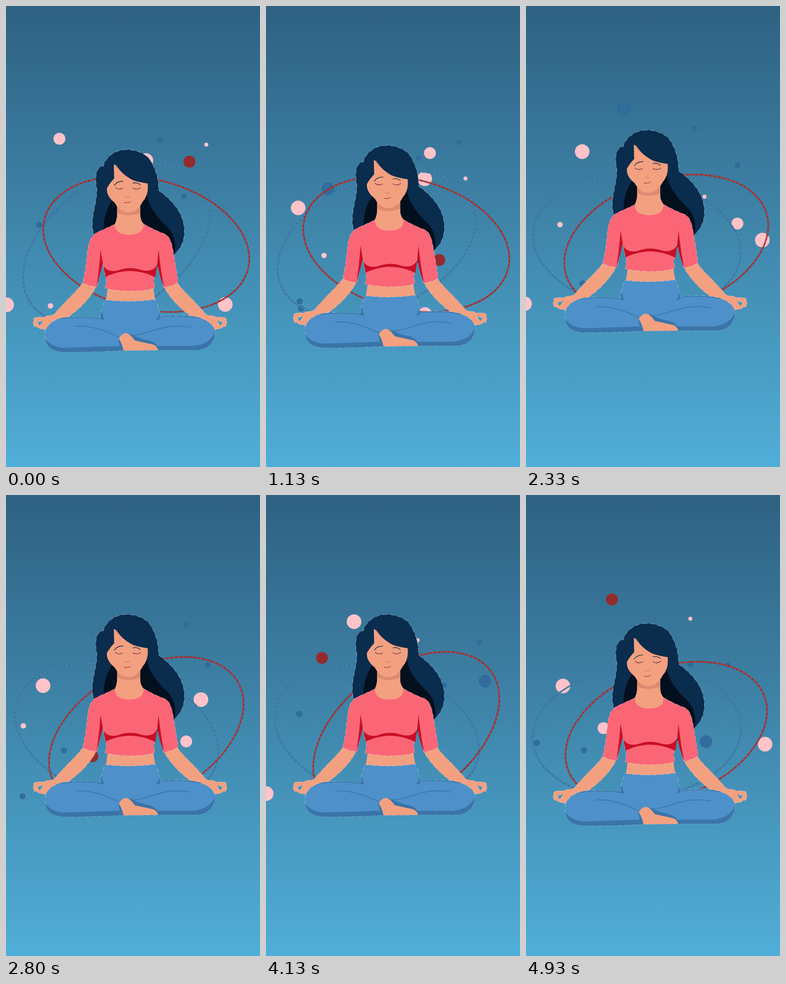
These frames come from a looping animation (556 by 1007 pixels, 4990 ms). An HTML page:

```html
<!DOCTYPE html>
<html lang="en">
<head>
<meta charset="utf-8">
<title>Meditation</title>
<style>
  html, body { margin: 0; width: 100%; height: 100%; overflow: hidden; background: #4187ac; }
  svg { display: block; width: 100vw; height: 100vh; }
  .ring { fill: none; stroke-width: 3.2; }
  .glint { fill: none; stroke: #a9cfe4; stroke-width: .9; stroke-opacity: .55; stroke-dasharray: 7 3; }
  .rim { stroke: #d3e4ee; stroke-opacity: .55; stroke-width: 1; stroke-dasharray: 9 6; }
  .line { fill: none; stroke-linecap: round; }
  .skin { fill: #f3a080; }
  .shirt { fill: #fb6676; }
  .seam { fill: #c90f25; }
  .fold { stroke: #3a74a8; stroke-width: 1.6; }
</style>
</head>
<body>
<svg viewBox="0 0 556 1007" preserveAspectRatio="none">
  <defs>
    <linearGradient id="sky" x2="0" y2="1">
      <stop offset="0" stop-color="#2e6182"/>
      <stop offset=".5" stop-color="#4087ac"/>
      <stop offset="1" stop-color="#50aed8"/>
    </linearGradient>
    <g id="arm">
      <path class="skin rim" fill-rule="evenodd" d="M168 605 Q157 620 137 639 Q117 660 104 675 Q92 676 80 680 L66 680 Q59 682 61 687 Q57 692 61 696 Q60 702 67 701 Q75 707 89 707 Q99 703 108 697 Q140 680 165 656 Q189 632 198 612Z M69 688 L73 690 L80 687 Q79 694 74 698 Q69 694 69 688Z"/>
    </g>
  </defs>
  <rect width="556" height="1007" fill="url(#sky)"/>
  <g id="dots"></g>
  <g id="blueRing">
    <ellipse class="ring" cx="242.5" cy="520" rx="228.5" ry="142.5" stroke="#34709f"/>
    <ellipse class="glint" cx="242.5" cy="520" rx="228.5" ry="142.5"/>
  </g>
  <g id="redRing">
    <ellipse class="ring" cx="307" cy="520" rx="229.5" ry="142.5" stroke="#a3211f"/>
    <ellipse class="glint" cx="307" cy="520" rx="229.5" ry="142.5"/>
  </g>
  <g id="figure">
    <!-- hair behind the body -->
    <path class="rim" fill="#0a2c4d" d="M263 314 C240 314 218 330 213 350 C198 351 193 372 199 400 C199 430 189 450 189 478 Q189 492 194 502 L240 520 L340 520 L369 542 C386 528 393 505 390 483 C386 450 365 426 334 403 C335 375 325 350 313 333 C301 320 281 314 263 314Z"/>
    <path fill="#020f1d" d="M233 424 C219 445 213 465 214 490 L245 490 L245 435Z M308 412 C313 440 331 462 352 482 C369 499 373 520 369 542 L331 570 L331 500 L292 480 L292 436Z"/>
    <use href="#arm"/>
    <use href="#arm" transform="matrix(-1 0 0 1 543 0)"/>
    <!-- torso -->
    <path class="skin" d="M222 610 Q223 622 217 650 L329 650 Q322 622 323 610Z"/>
    <path class="shirt rim" d="M238 477 Q216 487 199 495 C184 502 180 520 178 540 L174 575 L168 605 Q180 612 199 614 L211 560 L215 580 L220 600 L217 617 Q245 623 272 623 Q305 623 326 616 L323 600 Q329 583 331 560 L345 615 Q362 613 377 604 L370 560 C365 530 363 505 347 498 Q325 490 301 476Z"/>
    <path class="seam" d="M207 533 Q204 575 198 613 Q205 590 212 562Z M334 533 L331 562 Q337 595 346 614 Q338 575 334 533Z"/>
    <path class="seam" d="M213 567 Q222 583 245 578 Q270 568 297 577 Q321 583 331 565 L327 593 Q303 580 271 579 Q242 580 218 592Z"/>
    <!-- neck and head -->
    <path class="skin" d="M243 428 L243 460 Q242 469 238 477 C238 493 251 500 270 500 C290 500 302 492 301 476 Q294 467 294 458 L294 428Z"/>
    <path fill="#dc8c70" d="M243 436 L243 452 Q268 463 294 452 L294 436Z"/>
    <path class="skin" d="M236 346 L240 374 Q229 384 221 398 Q219 415 238 430 Q249 451 268 451 Q288 450 299 428 Q313 413 310 387 Q280 382 236 346Z"/>
    <path fill="#0a2c4d" d="M234 345 Q250 380 311 388 L322 360 L270 325Z"/>
    <path class="skin" d="M236 346 L237 385 Q246 379 280 382 Q253 368 239 347Z"/>
    <path class="line" stroke="#f3a080" stroke-width="1" d="M241 348 Q255 372 280 384"/>
    <path class="line" stroke="#0a2c4d" stroke-width="1.4" d="M237 392 Q243 383 256 383 M278 387 Q288 385 294 391"/>
    <path class="line" stroke="#79404a" stroke-width="1.5" d="M239 397 Q247 403 255 398 M278 398 Q287 403 295 397"/>
    <path class="line" stroke="#d37662" stroke-width="1.4" d="M261 417 Q265 419 270 417"/>
    <path class="line" stroke="#b64246" stroke-width="1.4" d="M259 429 Q267 432 273 427"/>
    <!-- legs -->
    <path class="rim" fill="#4e90c9" d="M217 642 Q270 649 327 641 Q336 660 337 678 Q365 675 393 676 C435 678 457 696 458 712 C456 738 440 752 415 752 L333 752 L254 753 Q190 757 125 756 C96 754 85 735 85 714 C91 688 118 679 145 679 Q178 679 206 683 Q208 660 217 642Z"/>
    <path fill="#3a74a8" d="M86 727 Q98 744 125 747 L248 743 L254 753 Q190 757 125 756 C100 754 89 744 86 727Z M458 712 C456 738 440 752 415 752 L333 752 L329 743 L410 743 Q445 740 458 712Z"/>
    <path fill="#3a74a8" d="M211 665 Q207 674 206 684 L216 686 Q210 678 211 665Z M335 665 Q337 674 337 684 L328 686 Q336 678 335 665Z M246 724 L258 753 L253 753 Q247 741 246 724Z M268 715 Q295 728 314 731 Q330 735 335 752 L325 745 L283 733Z"/>
    <path class="line fold" d="M152 700 Q190 696 246 723 M272 719 C310 722 340 690 404 702"/>
    <path class="line fold" d="M118 683 Q160 677 206 683 M337 679 Q385 674 425 682"/>
    <path class="skin" d="M247 727 Q254 714 264 715 Q272 717 282 731 Q305 736 323 740 Q332 745 333 752 L257 753 Q255 738 247 727Z"/>
  </g>
</svg>
<script>
const LOOP = 4990, STEP = 200 / 3, PERIOD = 6667, START = -400;
const PINK = '#ffc3c9', RED = '#952a2d', BLUE = '#316d9f';
const LEAD = 1780, LAG = -2130;

// Closed tracks: x, y at equal time intervals, each shared by three dots [time shift, colour, radius].
const tracks = [
  { points: [117,290, 207,224, 290,285, 381,332, 474,375, 459,483, 377,558, 348,667, 265,668, 187,567, 162,473, 134,393],
    dots: [[0, PINK, 13], [LEAD, RED, 13], [LAG, BLUE, 13]] },
  { points: [480,652, 521,520, 419,441, 325,357, 231,272, 116,325, 68,445, -24,540, -14,643, 120,674, 235,680, 357,673],
    dots: [[0, PINK, 16], [LEAD, PINK, 16], [LAG, PINK, 16]] },
  { points: [130,695, 100,690, 35,657, 90,660, 115,625, 124,603, 127,543, 124,490, 80,476, 37,506, 25,570, 78,650],
    dots: [[0, BLUE, 6], [LEAD, PINK, 6], [LAG, BLUE, 6]] },
  { points: [337,294, 366,268, 397,286, 431,301, 464,311, 462,351, 436,378, 425,416, 394,418, 372,395, 352,355, 333,330],
    dots: [[0, BLUE, 5], [LEAD, PINK, 4.5], [LAG, BLUE, 5]] }
];

const byId = id => document.getElementById(id);
const wave = (time, middle, swing, low) => middle - swing * Math.cos((time - low) / PERIOD * 2 * Math.PI);

// Catmull-Rom position on a closed track.
function along(points, time) {
  const count = points.length / 2;
  const turn = (time - START) / PERIOD;
  const place = (turn - Math.floor(turn)) * count;
  const i = Math.floor(place), f = place - i;
  return [0, 1].map(axis => {
    const [a, b, c, d] = [-1, 0, 1, 2].map(k => points[(i + k + count) % count * 2 + axis]);
    return b + f / 2 * (c - a + f * (2 * a - 5 * b + 4 * c - d + f * (3 * (b - c) + d - a)));
  });
}

const dots = tracks.flatMap(({ points, dots }) => dots.map(([shift, colour, radius]) => {
  const node = document.createElementNS('http://www.w3.org/2000/svg', 'circle');
  node.setAttribute('r', radius);
  node.setAttribute('fill', colour);
  if (colour === BLUE) node.setAttribute('stroke', '#28608f');
  byId('dots').append(node);
  return { node, points, shift };
}));

function draw(now) {
  const t = now % LOOP;
  // The loop opens on a held pose, then jumps ahead.
  const time = t < 130 ? START : Math.floor((t + 4) / STEP) * STEP;
  byId('figure').setAttribute('transform', `translate(0 ${wave(time, -27.8, 31.4, 3465)})`);
  byId('redRing').setAttribute('transform', `rotate(${wave(time, -8.8, -29.6, 3700) * 1 - 2 * wave(time, 0, -29.6, 3700)} 307 520)`);
  byId('blueRing').setAttribute('transform', `rotate(${wave(time, -7.8, -29.2, 3400)} 242.5 520)`);
  for (const { node, points, shift } of dots) {
    const [x, y] = along(points, time + shift);
    node.setAttribute('cx', x);
    node.setAttribute('cy', y);
  }
  requestAnimationFrame(draw);
}
draw(0);
</script>
</body>
</html>
```
